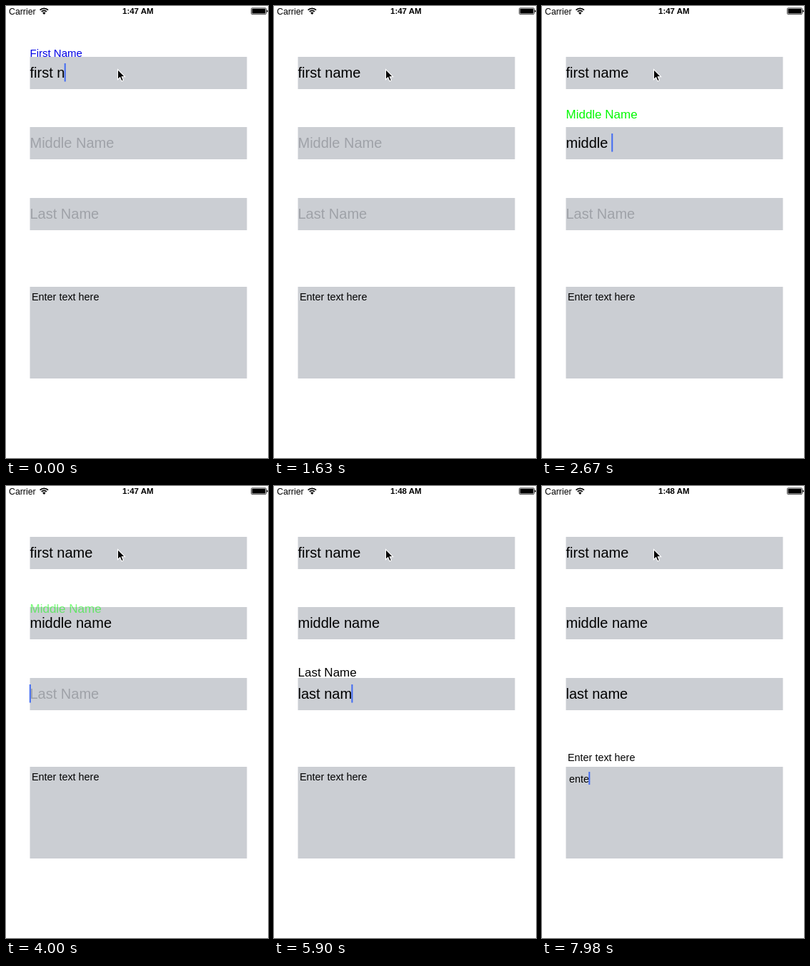
An HTML page that plays this animation: 367 px wide and 631 px high, repeating every 8 s.

```html
<!DOCTYPE html>
<html lang="en">
<head>
<meta charset="utf-8">
<title>Floating labels</title>
<style>
  html, body { margin: 0; width: 100%; height: 100%; overflow: hidden; background: #fff; }
  svg { display: block; }
  text { font-family: "Liberation Sans", Arial, sans-serif; white-space: pre; }
  .box { fill: #cbced3; }
  .hint { fill: #9fa2a8; }
  .caret { fill: #426bf2; }
</style>
</head>
<body>
<svg id="stage" width="367" height="631" viewBox="0 0 367 631">
  <g id="status">
    <text x="4" y="11.5" font-size="12.3">Carrier</text>
    <g fill="none" stroke="#000" stroke-width="1.8">
      <path d="M47.6 5.6a8.2 8.2 0 0 1 11.4 0"/>
      <path d="M49.8 7.9a5 5 0 0 1 7 0"/>
    </g>
    <path d="M53.3 12l-2.2-2.4a3.2 3.2 0 0 1 4.4 0z"/>
    <text id="clock" x="163" y="11.3" font-size="11.5" font-weight="700"></text>
    <rect x="343.5" y="2.8" width="21" height="8.8" rx="1.4" fill="none" stroke="#000" stroke-width=".7"/>
    <rect x="344.6" y="3.8" width="18.8" height="6.8" rx=".6"/>
    <path d="M365.3 5.6q1.5.3 1.5 1.6t-1.5 1.6z"/>
  </g>
  <g id="form"></g>
  <path d="M156.5 88.5v14.2l3.2-3 2.2 5.1 2.5-1.1-2.1-4.9h4.4z" stroke="#fff" stroke-width="1.1"/>
</svg>
<script>
const LOOP = 8000, TICK = 147.6, STEP = 147.8;
const form = document.getElementById("form");
const clock = document.getElementById("clock");
const pen = document.createElement("canvas").getContext("2d");

// typed: [tick, text]; caret: [tick, opacity]; show and hide: [start ms, duration ms]
const fields = [
  {
    top: 71, height: 45, x: 33.5, base: 100, size: 20, hint: "First Name",
    label: { x: 33.5, from: 98, to: 71, size: 15, color: "#0000e6" },
    typed: [[0, "first n"], [1, "first na"], [2, "first nam"], [3, "first name"]],
    caret: [[0, 1], [6, 0]],
    show: [-1000, 300], hide: [850, 330]
  },
  {
    top: 169, height: 45, x: 33.5, base: 198, size: 20, hint: "Middle Name",
    label: { x: 33.5, from: 198, to: 157, size: 17, color: "#00f900" },
    typed: [[0, ""], [12, "m"], [13, "mi"], [14, "mid"], [15, "midd"], [16, "middl"], [17, "middle"],
      [18, "middle "], [19, "middle na"], [20, "middle nam"], [22, "middle name"]],
    caret: [[0, 0], [6, 1], [10, .4], [11, 0], [12, 1], [24, 0]],
    show: [1720, 1000], hide: [3490, 1010]
  },
  {
    top: 268, height: 45, x: 33.5, base: 297, size: 20, hint: "Last Name",
    label: { x: 33.5, from: 297, to: 266, size: 17, color: "#000" },
    typed: [[0, ""], [32, "l"], [33, "la"], [34, "las"], [35, "last"], [36, "last "],
      [37, "last n"], [38, "last na"], [39, "last nam"], [40, "last name"]],
    caret: [[0, 0], [24, 1], [28, .4], [29, 0], [31, 1], [44, 0]],
    show: [4690, 500], hide: [6480, 940]
  },
  {
    top: 392, height: 128, x: 38, base: 413.5, size: 14.4, hint: "Enter text here",
    hintX: 36, hintBase: 410.5, hintColor: "#000", hintEnd: 44,
    label: { x: 36, from: 410.5, to: 383.5, size: 14.4, color: "#000" },
    typed: [[0, ""], [52, "e"], [53, "ent"], [54, "ente"]],
    caret: [[0, 0], [44, 1], [48, .4], [49, 0], [50, 1]],
    show: [7640, 320], hide: [9000, 300]
  }
];

function add(tag, attrs, content = "") {
  const node = document.createElementNS("http://www.w3.org/2000/svg", tag);
  for (const key in attrs) node.setAttribute(key, attrs[key]);
  node.textContent = content;
  return form.appendChild(node);
}

function build(f) {
  const { x, base, size, label } = f;
  const area = f.height > 100;
  add("rect", { class: "box", x: 33.5, y: f.top, width: 304, height: f.height });
  f.hintNode = add("text", { class: "hint", x: f.hintX || x, y: f.hintBase || base, "font-size": size }, f.hint);
  if (f.hintColor) f.hintNode.style.fill = f.hintColor;
  f.labelNode = add("text", { x: label.x, "font-size": label.size, fill: label.color }, f.hint);
  f.textNode = add("text", { x, y: base, "font-size": size });
  f.caretNode = add("rect", {
    class: "caret", y: area ? 399 : f.top + 9, width: 2, height: area ? 18 : 25.5
  });
}

function at(steps, tick) {
  let value = steps[0][1];
  for (const [start, v] of steps) if (tick >= start) value = v;
  return value;
}

function ease(time, [start, length]) {
  const p = Math.min(1, Math.max(0, (time - start) / length));
  return p * p * (3 - 2 * p);
}

function textWidth(text, size) {
  pen.font = size + 'px "Liberation Sans", Arial, sans-serif';
  return pen.measureText(text).width;
}

function drawField(f, tick, time) {
  const text = at(f.typed, tick);
  const lift = ease(time, f.show) - ease(time, f.hide);
  const { from, to } = f.label;
  f.textNode.textContent = text;
  f.hintNode.setAttribute("opacity", text || tick >= f.hintEnd ? 0 : 1);
  f.labelNode.setAttribute("y", from + (to - from) * lift);
  f.labelNode.setAttribute("opacity", lift);
  f.caretNode.setAttribute("x", f.x - 0.7 + textWidth(text, f.size));
  f.caretNode.setAttribute("opacity", at(f.caret, tick));
}

let last = -1;
function draw(now) {
  const tick = Math.floor((now % LOOP) / TICK);
  if (tick !== last) {
    last = tick;
    clock.textContent = tick < 36 ? "1:47 AM" : "1:48 AM";
    for (const f of fields) drawField(f, tick, tick * STEP);
  }
}

function loop() {
  draw(performance.now() - begin);
  requestAnimationFrame(loop);
}

fields.forEach(build);
const begin = performance.now();
loop();
</script>
</body>
</html>
```
